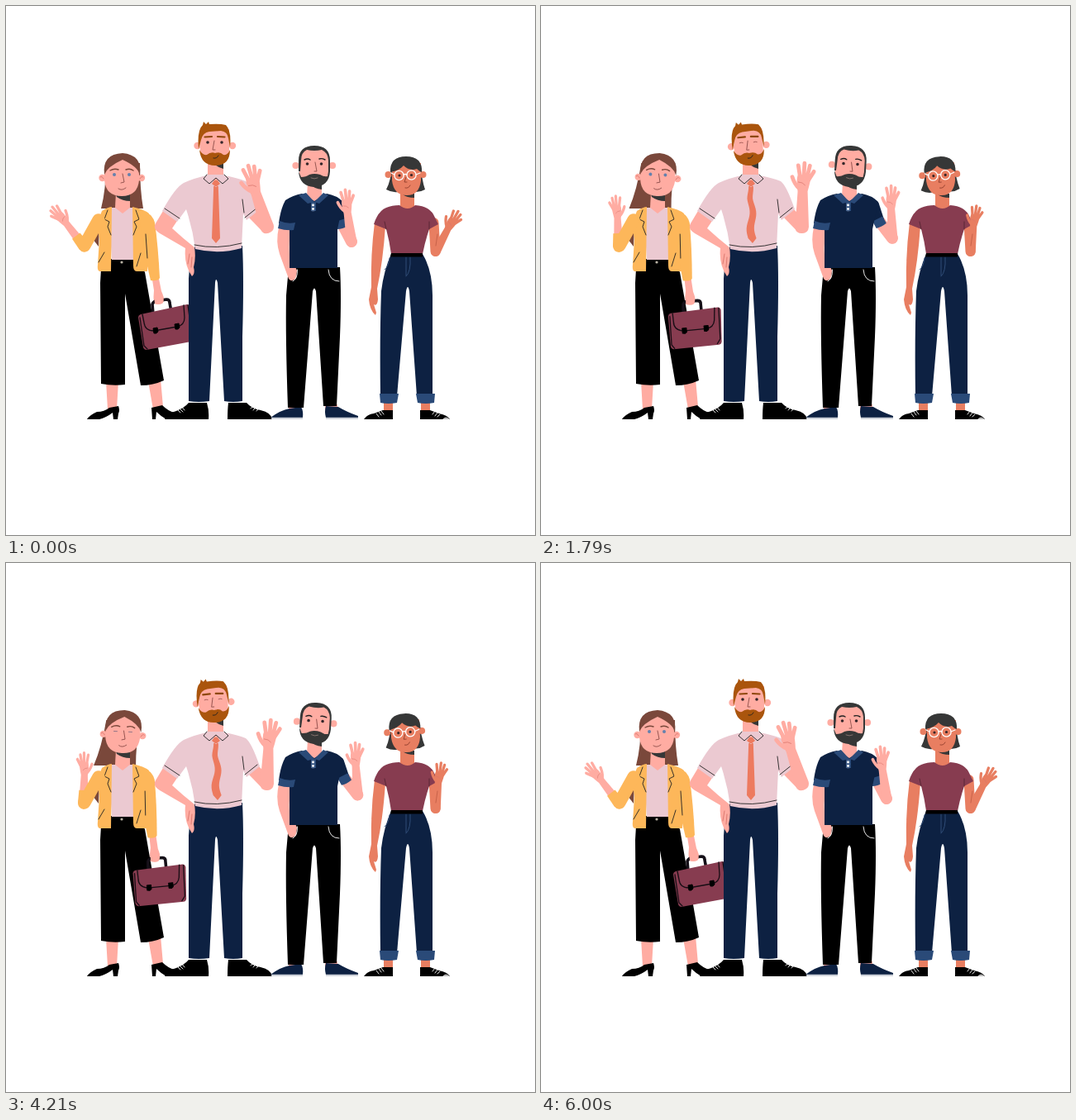
These frames come from a looping animation (640 by 640 pixels, 6.07 s). An HTML page:

```html
<!DOCTYPE html>
<html lang="en">
<head>
<meta charset="utf-8">
<title>Waving team</title>
<style>
  html, body { margin: 0; width: 100%; height: 100%; overflow: hidden; background: #fff; }
  svg { display: block; width: 100vw; height: 100vh; }
  .skin { fill: #ffaca2; color: #ffaca2; }
  .tan { fill: #e87e61; color: #e87e61; }
  .pink { fill: #ebc9d1; }
  .navy { fill: #0d2142; }
  .blue { fill: #2a4a78; }
  .plum { fill: #873c50; }
  .yellow { fill: #fdb75a; }
  .brown { fill: #7a483b; }
  .ginger { fill: #aa550d; }
  .dark { fill: #363737; }
  .line { fill: none; stroke: #222; stroke-width: .9; stroke-linecap: round; stroke-linejoin: round; }
  .white { stroke: #fff; }
  .lid { visibility: hidden; }
  .shut .lid { visibility: visible; }
  .shut .eye { visibility: hidden; }
</style>
</head>
<body>
<svg viewBox="0 0 640 640">
  <defs>
    <!-- forearm and open hand, elbow at the origin, pointing up -->
    <g id="forearm">
      <path fill="currentColor" d="M-8 0Q-8 8 0 8Q8 8 8.5 0L6 -43Q9 -54 9.500 -61L-6 -63Q-8 -58 -7 -53L-6 -42Z"/>
      <path fill="none" stroke="currentColor" stroke-width="4.8" stroke-linecap="round"
        d="M-3.5 -60L-6 -74M1 -61L1.500 -77M5 -60L8 -74M7 -57L13 -67M-4 -46Q-10 -51 -13 -60"/>
      <path fill="none" stroke="#d9756d" stroke-width=".7" d="M-6 -54Q0 -54 3 -50"/>
    </g>
  </defs>

  <g id="jacketWoman">
    <g id="backHair"><path class="brown" d="M121 190Q121 222 115 245H166Q162 222 162 190Z"/></g>
    <path class="skin" d="M121 454H136L134 488H123ZM172 454L187 451L190 485L178 488Z"/>
    <path d="M98 500Q101 495 110 491Q119 491 125 486L136 484Q138 489 136 493L135 500H130L129 492Q121 498 113 500Z"/>
    <path d="M176 486L189 483Q196 490 204 492V500H194Q187 496 182 491L181 500H177Z"/>
    <path d="M127 306H155L168 322L191 453Q178 459 163 459L144 348V458Q130 460 115 457L114 335L115 318Z"/>
    <path class="pink" d="M124 244H157L154 307H128Z"/>
    <circle cx="140" cy="310" r="1.6" fill="#b9b3a5"/>
    <path class="skin" d="M133 226H150V244L141 251L132 244Z"/>
    <path class="dark" d="M133 228H150V236Q141 236 134 231Z"/>
    <path class="brown" d="M113 266L105 282L112 291Z"/>
    <path class="yellow" d="M116 248Q124 243 128 243L127 321H114Q110 321 111 313L113 282L110 264ZM153 243Q167 246 173 251L171 321H158Q154 321 154 314Z"/>
    <path class="line" d="M123 247L119 258L125 261L123 267L127 277M157 247L161 258L155 261L158 267L154 277M112 310L119 298M158 315L163 299"/>
    <g class="skin" id="waveA"><use href="#forearm" transform="scale(-.68 .78)"/><path class="yellow" d="M-7 0Q-7 7 0 8Q7 7 7 0L6 -15L-6 -15Z"/></g>
    <path d="M112 259L95 289.5" fill="none" stroke="#fdb75a" stroke-width="15.5" stroke-linecap="round"/>
    <g id="bagArm">
      <path class="skin" d="M176 325L184 325L188 345Q192 353 190 359Q185 362 179 360Q178 352 179 344Z"/>
      <g id="bag">
        <path d="M178 373L177 361Q178 358 181 357L194 355Q198 355 198 359L200 370" fill="none" stroke="#151018" stroke-width="3.6"/>
        <path class="skin" d="M179 350H190Q192 357 189 360Q184 362 180 360Z"/>
        <path class="plum" d="M163 373L219 361Q222 361 223 364L227 402Q227 405 224 406L170 416Q167 416 166 413L160 377Q160 374 163 373Z"/>
        <path class="line" style="stroke:#170d14;stroke-width:1.3" d="M165 373L167 383Q168 393 179 393L207 388Q216 386 216 377L215 362M162 377L167 411L171 415M220 362L225 399L222 405"/>
        <path d="M178 390L183 389L184 394L182 396H179ZM204 385L209 384L210 389L208 391H205Z" stroke="#000" stroke-linejoin="round"/>
      </g>
      <path class="yellow" d="M160 248Q176 248 180 262Q184 290 186 329Q184 333 175 332L171 315L165 280Z"/>
      <path class="line" d="M169 276L171 305"/>
    </g>
    <g id="headA">
      <g class="skin"><circle cx="116.500" cy="208" r="4.200"/><circle cx="164" cy="208" r="4.200"/>
      <path d="M119 203Q122 181 141 180Q158 181 161 203V211Q159 230 140 230Q121 230 119 211Z"/></g>
      <path class="brown" d="M119 204Q116 179 141 178Q165 180 162 204Q159 194 141 186Q123 194 119 204Z"/>
      <path class="line" stroke-width=".8" style="stroke:#d9756d" d="M114 207Q116 205 118 209M166 207Q164 205 162 209"/>
      <path class="line" style="stroke:#7a483b;stroke-width:1.4" d="M126 199Q131 196 136 198M145 198Q150 196 154 199"/>
      <g id="eyesA"><g class="eye" fill="#6581ad"><circle cx="131" cy="204" r="2"/><circle cx="149" cy="204" r="2"/></g>
      <path class="lid line" style="stroke:#8b7185" d="M129 204H133M147 204H151"/></g>
      <path class="line" style="stroke:#8c4d49" d="M141 203L143 213L139 214M136 221Q140 224 145 220"/>
    </g>
  </g>

  <g id="tieMan">
    <path d="M192 500Q196 492 206 490Q216 486 221 480H243Q246 490 245 500ZM268 500Q268 488 269 480H291Q297 487 308 489Q321 492 322 500Z"/>
    <path class="line white" d="M206 487L211 492M209 486L214 491M212 484L216 489M296 487L300 483M299 489L303 485M303 490L307 486"/>
    <path class="navy" d="M229 290H286Q288 330 286 400V478Q275 480 264 478L256 335Q254 327 253 335L246 478Q233 480 221 478V330Q222 305 229 290Z"/>
    <path class="skin" d="M190 248L181 263Q177 270 186 275L217 293Q215 313 225 327Q229 324 227 316Q230 305 228 292Q214 281 201 269L207 260Z"/>
    <path class="line" style="stroke:#d9756d" d="M222 300L220 312M225 304L224 316"/>
    <path class="skin" d="M244 184H263V207L254 214L244 207Z"/>
    <path class="dark" d="M250 190H263V197Q257 196 252 191Z"/>
    <path d="M297 248L315.500 267" fill="none" stroke="#ffaca2" stroke-width="15.5" stroke-linecap="round"/>
    <path class="pink" d="M243 205L254 213L264 205Q280 208 290 212Q297 217 307 246L291 259L287 251L285 293Q257 301 229 294Q226 270 218 246L207 261L189 248Q205 219 215 214Q228 208 243 205Z"/>
    <path class="line" d="M228 289Q255 295 285 287M192 245L210 257M289 256L304 244M286 234L288 250"/>
    <path id="tie" fill="#ed7a5f"/>
    <path class="pink line" style="fill:#ebc9d1" d="M243 204L239 209L246 215L254 208L262 215L269 209L264 204"/>
    <g class="skin" id="waveB"><use href="#forearm"/></g>
    <g id="headB">
      <g class="skin"><circle cx="231.500" cy="169" r="4.200"/><circle cx="274" cy="169" r="4.200"/>
      <path d="M235 149H270V178Q268 192 253 192Q238 192 235 178Z"/></g>
      <path class="ginger" d="M233 173Q231 150 238 144L239 140L242 143L245 140L246 143Q259 142 266 144Q273 151 271 171L269 160Q268 152 260 151L246 152Q238 153 236 162ZM234 174Q238 181 243 180Q248 176 253 178Q259 176 263 180Q268 181 271 174Q271 193 253 193Q236 193 234 174Z"/>
      <path class="line" style="stroke:#8e470b;stroke-width:2.2" d="M240.500 158.500L249 158M256 158L264.500 158.500"/>
      <g id="eyesB"><g class="eye" fill="#35262a"><circle cx="244" cy="165" r="1.8"/><circle cx="261" cy="165" r="1.8"/></g>
      <path class="lid line" style="stroke:#a25a55" d="M242 165Q244 164 246 165M259 165Q261 164 263 165"/></g>
      <path class="line" d="M252 163L250 174H253" style="stroke:#8c4d49"/>
      <path class="line" d="M251 184Q255 185 257 181"/>
    </g>
  </g>

  <g id="poloMan">
    <path class="skin" d="M342 482H357V490H342ZM386 482H401V490H386Z"/>
    <path class="navy" d="M320 498Q332 489 343 487L357 485Q360 490 359 498ZM387 498Q385 490 387 484L402 485Q412 491 426 496V498Z"/>
    <path d="M321 498.800H359M387 498.800H426" stroke="#c9ced6" stroke-width="2"/>
    <path d="M342 316H404Q406 350 404 400L400 484H384L375 345Q373 338 371 345L360 486H341Q338 400 339 350Z"/>
    <path class="skin" d="M330 268Q326 285 331 300L342 330Q346 335 351 329L352 320L343 300Q342 285 345 268Z"/>
    <path class="line white" d="M390 319Q391 333 403 333M352.500 319Q353 330 347 333"/>
    <path class="skin" d="M365 214H382V232L373 238L364 230Z"/>
    <path class="dark" d="M366 215H382V222Q373 221 368 216Z"/>
    <g id="poloArm">
      <path d="M406 262L418 285" fill="none" stroke="#ffaca2" stroke-width="14" stroke-linecap="round"/>
      <path class="navy" d="M386 230Q403 231 409 240L412 261L400 265L392 245Z"/>
      <path class="blue" d="M398 261L411 257L414 266Q407 270 401 270Z"/>
    </g>
    <path class="navy" d="M358 227L373 236L388 227Q400 229 408 237L401 270V317H343V265L330 263Q332 246 338 235Q347 229 358 227Z"/>
    <path class="blue" d="M331 260Q340 264 350 262L348 271Q339 272 329 269ZM354 229L363 226L373 237L384 226L390 229L379 239L373 237L365 239Z"/>
    <path class="blue" d="M369 237H375V248H369Z"/>
    <path d="M370 239H373V248H370Z" fill="none" stroke="#7189ad" stroke-width=".6"/>
    <circle cx="371.500" cy="241" r="1.400" fill="#fff"/><circle cx="371.500" cy="245.500" r="1.400" fill="#fff"/>
    <g class="skin" id="waveC"><use href="#forearm" transform="scale(.76 .82)"/></g>
    <g id="headC">
      <g class="skin"><circle cx="350.500" cy="193" r="4.100"/><circle cx="395" cy="193" r="4.100"/>
      <path d="M355 186Q358 171 373 171Q388 171 391 186V203Q388 218 373 218Q358 218 355 203Z"/></g>
      <path class="dark" d="M354 200V187Q354 169 373 169Q392 169 392 187V200Q391 218 373 219Q355 218 354 200L357 207Q363 207 367 204Q373 202 380 204Q385 207 389 206L390 200V186Q389 177 382 174Q373 176 364 174Q357 177 357 187L356 200Z"/>
      <path class="line" style="stroke-width:1.400" d="M361 186Q365 184 368 186M379 185Q382 184 386 186"/>
      <g id="eyesC"><g class="eye" fill="#35262a"><circle cx="364.500" cy="191" r="1.800"/><circle cx="381.500" cy="191" r="1.800"/></g>
      <path class="lid line" d="M361 190Q365 188 368 190M378 190Q381 188 385 190"/></g>
      <path class="line" style="stroke:#8c4d49" d="M374 189L376 200H373"/>
      <path class="line" style="stroke:#8d7772" d="M369 208Q373 210 377 208"/>
    </g>
  </g>

  <g id="glassesWoman">
    <path class="tan" d="M457 478H468V491H457ZM502 478H513V491H502Z"/>
    <path d="M433 500Q437 494 445 493L456 489H468V500ZM501 500V489H513L524 493Q534 495 537 500Z"/>
    <path class="line white" d="M448 493L451 497M451 491L454 495M454 490L457 494M516 494L519 490M519 496L522 492M522 497L525 494"/>
    <path d="M528 500Q532 495 537 500Z" fill="#bbb"/>
    <path class="navy" d="M466 300H504Q516 320 516 350V472H497L488 345Q486 335 484 345L473 472H453Q452 400 454 345Q457 320 466 300Z"/>
    <path class="blue" d="M452 469H475L473 480Q462 482 453 480ZM496 469H519L518 480Q507 482 498 480Z"/>
    <path class="line" style="stroke:#34527d" d="M484 304V326M489 304Q490 322 484 327M464 305Q463 315 458 319"/>
    <path class="tan" d="M446 262Q441 300 442 340L439 355Q440 368 447 374L448 371L445 361Q449 364 450 355L449 342Q456 310 459 266Z"/>
    <path d="M517.500 262L519.500 297" fill="none" stroke="#e87e61" stroke-width="12" stroke-linecap="round"/>
    <path class="tan" d="M477 227H494V243Q485 249 477 243Z"/>
    <path class="dark" d="M479 227H494V232Q485 232 480 228Z"/>
    <path class="plum" d="M476 241Q486 249 495 241Q511 242 517 252L523 264L512 270Q507 285 504 300H466Q464 285 460 270L445 264Q450 248 460 244Q467 241 476 241Z"/>
    <path class="line" d="M460 270L458 261M512 270L512 261" style="stroke:#562432"/>
    <path d="M466 299H504V303.500H465Z"/>
    <g class="tan" id="waveD"><use href="#forearm" transform="scale(.68 .72)"/></g>
    <path class="line" style="stroke:#b9573f;stroke-width:.7" d="M522 276L520 290"/>
    <g id="headD">
      <path class="dark" d="M467 192Q466 211 460 222Q467 226 474 225H496Q502 225 507 222Q503 211 502 192Z"/>
      <g class="tan"><circle cx="462.500" cy="204" r="4"/><circle cx="504.500" cy="204" r="4"/>
      <path d="M467 190H502V211Q500 229 485 229Q469 229 467 211Z"/></g>
      <path class="dark" d="M465 201Q464 182 484 182Q504 182 503 201Q500 200 497 197Q488 200 481 193Q476 199 465 201Z"/>
      <g id="eyesD"><g class="eye" fill="#35262a"><circle cx="476" cy="205" r="1.600"/><circle cx="490.500" cy="204.500" r="1.600"/></g>
      <path class="lid line" d="M474 205H478M489 204.500H493" style="stroke:#a84e39"/></g>
      <g class="line white" style="stroke-width:1.300"><circle cx="475.500" cy="205" r="5.600"/><circle cx="490.500" cy="204.500" r="5.600"/><path d="M481 204Q483 203 485 204M470 204L466 202M496 204L501 202"/></g>
      <path class="line" style="stroke:#8f3d2c" d="M484 207L482 213H485M483 220Q487 221 489 217"/>
    </g>
  </g>
</svg>
<script>
const LOOP = 6070, STEP = LOOP / 85;
const $ = id => document.getElementById(id);
const ease = u => (1 - Math.cos(Math.PI * u)) / 2;

// Eased value between [time, value] keys.
function keyed(t, keys) {
  let i = 1;
  while (i < keys.length - 1 && t > keys[i][0]) i++;
  const [t0, v0] = keys[i - 1], [t1, v1] = keys[i];
  return v0 + (v1 - v0) * ease(Math.min(1, (t - t0) / (t1 - t0)));
}

const waveA = [[0, -38], [1500, 3], [2700, -38], [4350, 3], [6000, -38]];
const waveC = [[0, -8], [1500, 0], [3000, -27], [4500, 0], [6000, -8]];
const waveD = [[0, 28], [1450, 3], [2950, 28], [4450, 3], [6000, 28]];
const blinks = { A: [4230], B: [1820, 4180], C: [780, 3280, 5720], D: [5200] };

const move = (id, transform) => $(id).setAttribute('transform', transform);
const turn = (id, a, x, y) => move(id, `rotate(${a} ${x} ${y})`);
const place = (id, x, y, a) => move(id, `translate(${x} ${y}) rotate(${a})`);

function tiePath(sway) {
  const left = [], right = [];
  for (let y = 218; y <= 281; y += 3) {
    const u = (y - 218) / 63;
    const x = 254 + sway * (2.8 * Math.sin(u * 9.9 + 2.83) * Math.min(1, u * 4) + 2 * u);
    const w = 2.8 + 2.2 * u;
    left.push(`${x - w} ${y}`);
    right.unshift(`${x + w} ${y}`);
  }
  return `M254 219L249 215L252 211H256L259 215ZM${left.join('L')}L${254 + 3 * sway} 287L${right.join('L')}Z`;
}

function draw(t) {
  const lean = keyed(t, [[0, 0], [3000, 1], [6000, 0]]);
  turn('headA', 4 * lean, 141, 235);
  move('backHair', `translate(0 192) skewX(${-14 * lean}) translate(0 -192)`);
  turn('headB', -5 * lean, 253, 196);
  turn('headC', 5 * lean, 373, 217);
  turn('headD', -4.5 * lean, 486, 229);
  turn('bagArm', 4 * lean, 168, 258);
  turn('bag', 3.2 * lean, 185, 354);
  $('tie').setAttribute('d', tiePath(lean));

  place('waveA', 94, 290, keyed(t, waveA));
  place('waveB', 315.5, 267, -18 + 30 * lean);
  place('waveD', 520, 297, keyed(t, waveD));

  turn('poloArm', -15 * lean, 397, 242);
  const a = (26 + 15 * lean) * Math.PI / 180;
  place('waveC', 397 + 48 * Math.sin(a), 242 + 48 * Math.cos(a), keyed(t, waveC));

  for (const k in blinks)
    $('eyes' + k).classList.toggle('shut', blinks[k].some(b => Math.abs(t - b) < 110));
}

const start = performance.now();
function tick() {
  const t = (performance.now() - start) % LOOP;
  draw(Math.floor(t / STEP) * STEP);
  requestAnimationFrame(tick);
}
tick();
</script>
</body>
</html>
```
